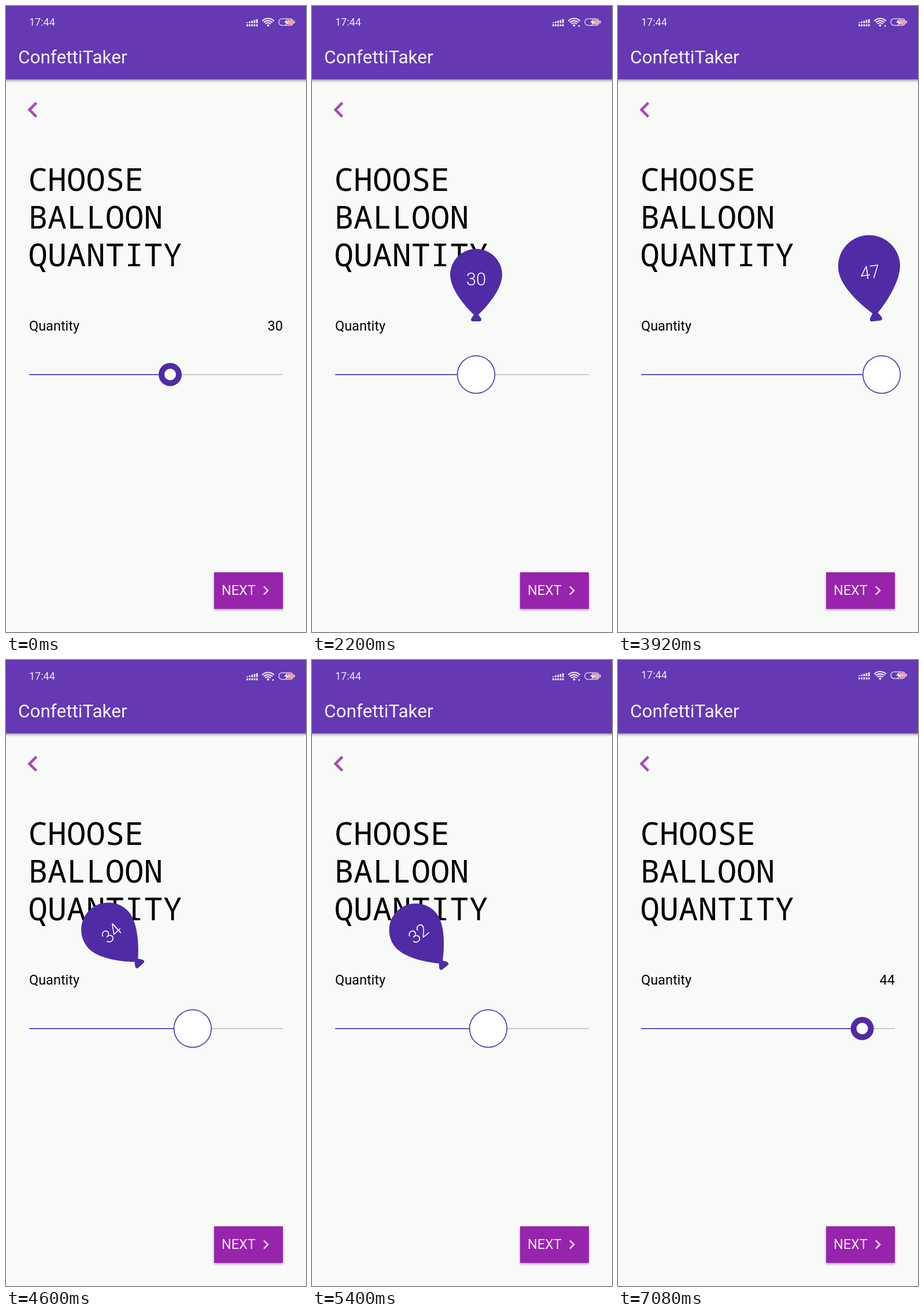
Write an HTML page with a canvas that moves like this. It is 519 px wide and 1080 px high and loops after 8.56 s.

```html
<!DOCTYPE html>
<html lang="en">
<head>
<meta charset="utf-8">
<style>
html, body { margin: 0; width: 100%; height: 100%; overflow: hidden; background: #f8faf8 }
canvas { display: block }
</style>
</head>
<body>
<canvas id="stage" width="519" height="1080"></canvas>
<script>
const c = document.getElementById('stage').getContext('2d');
const LOOP = 8560, LAG = 125;
const LEFT = 40, RIGHT = 479, TRACK_Y = 636, KNOT_Y = 544;
const INDIGO = '#4f2ca6', PURPLE = '#6439b3', PAPER = '#f8faf8';
const SANS = 'Roboto, "Open Sans", sans-serif';
const MONO = '"Noto Sans Mono", "DejaVu Sans Mono", monospace';

// Turning points of the drag: [time, x]
const drag = [[2200, 284], [3050, 73], [3110, 73], [3910, 456], [3985, 457], [4385, 152],
  [4780, 450], [5193, 164], [5622, 460], [5985, 82], [6360, 422.5]];

const balloon = new Path2D('M-45-17.5A45 45 0 0 1 45-17.5C45 4 24 32 4 51L8.5 57.5Q10 62.5 6 62.5' +
  'H-6Q-10 62.5-8.5 57.5L-4 51C-24 32-45 4-45-17.5Z');

const clamp = v => Math.min(1, Math.max(0, v));
const ramp = (t, a, b) => clamp((t - a) / (b - a));
const mix = (a, b, p) => a + (b - a) * p;
const easeOut = p => 1 - (1 - p) ** 3;
const backOut = p => 1 + 4 * (p - 1) ** 3 + 3 * (p - 1) ** 2;

function thumbX(t) {
  if (t <= drag[0][0]) return drag[0][1];
  for (let i = 1; i < drag.length; i++) {
    const [t0, x0] = drag[i - 1], [t1, x1] = drag[i];
    if (t < t1) return mix(x0, x1, (1 - Math.cos(Math.PI * ramp(t, t0, t1))) / 2);
  }
  return drag[drag.length - 1][1];
}

function text(s, x, y, size, color, { weight = 400, family = SANS, align = 'left' } = {}) {
  c.font = `${weight} ${size}px ${family}`;
  c.textAlign = align;
  c.fillStyle = color;
  c.fillText(s, x, y);
}

function box(x, y, w, h, color) {
  c.fillStyle = color;
  c.fillRect(x, y, w, h);
}

function raised(x, y, w, h, color) {
  c.save();
  c.shadowColor = 'rgba(0,0,0,.38)';
  c.shadowBlur = 4;
  c.shadowOffsetY = 2;
  box(x, y, w, h, color);
  c.restore();
}

function disc(x, y, r, color) {
  c.fillStyle = color;
  c.beginPath();
  c.arc(x, y, r, 0, 2 * Math.PI);
  c.fill();
}

function line(points, width, color) {
  c.strokeStyle = color;
  c.lineWidth = width;
  c.beginPath();
  points.forEach(([x, y]) => c.lineTo(x, y));
  c.stroke();
}

function statusBar(t) {
  const white = '#f1ebf8';
  c.save();
  c.translate(0, t < 6100 ? 0 : -1.5);
  text('17:44', 40, 33.5, 18, white);
  for (let i = 0; i < 5; i++) {
    const x = 416 + i * 4.2, h = 1.5 + i * 1.3;
    box(x, 29.5 - h, 2.8, h, white);
    box(x, 31.5, 2.8, 3.5, white);
  }
  c.strokeStyle = white;
  c.lineWidth = 2.2;
  for (const r of [6.5, 10.2, 14]) {
    c.beginPath();
    c.arc(453.5, 35.5, r, -Math.PI * .76, -Math.PI * .24);
    c.stroke();
  }
  disc(453.5, 33.5, 2, white);
  if (t > 1120 && t < 6300) box(461, 33, 2, 3, white);
  c.strokeStyle = '#d9cbea';
  c.lineWidth = 1.5;
  c.beginPath();
  c.roundRect(472, 22, 25, 11.5, 5.5);
  c.stroke();
  c.fillStyle = '#f3a49f';
  c.beginPath();
  c.roundRect(487, 23.5, 9, 8.5, [0, 4, 4, 0]);
  c.fill();
  box(498, 25.5, 1.8, 4.5, '#d9cbea');
  c.fillStyle = '#fff';
  c.fill(new Path2D('M487 22L481 28.5H485L483.5 34L489.5 27H485.5Z'));
  c.restore();
}

function page(t) {
  box(0, 0, 519, 1080, PAPER);
  raised(-10, -10, 539, 136.5, PURPLE);
  statusBar(t);
  text('ConfettiTaker', 21, 99, 31.5, '#f6f1fb');
  line([[52.5, 167], [40.5, 179], [52.5, 191]], 4.6, '#aa4abb');
  ['CHOOSE', 'BALLOON', 'QUANTITY'].forEach((word, i) =>
    text(word, 38.5, 319 + i * 65, 55.5, '#000', { family: MONO }));
  text('Quantity', 40, 560, 23.5, '#000');
  raised(360, 977, 119, 63, '#9824ad');
  text('NEXT', 373, 1016, 23.5, '#f6e6f8');
  line([[446, 1001.5], [453, 1008.5], [446, 1015.5]], 2.8, '#e6c6ea');
}

function drawBalloon(t, x, value, show) {
  if (show <= 0) return;
  const width = 65.5 + 44 * (x - LEFT) / (RIGHT - LEFT);
  const scale = width / 90 * show;
  const cx = thumbX(t - LAG);
  const restY = KNOT_Y - width * 125 / 180;
  c.save();
  c.translate(cx, mix(TRACK_Y, restY, show));
  c.rotate(Math.atan((cx - x) / 145));
  c.save();
  c.scale(scale, scale);
  c.fillStyle = INDIGO;
  c.fill(balloon);
  c.restore();
  c.scale(show, show);
  text(value, 0, .5, 31, '#fff', { weight: 300, align: 'center' });
  c.restore();
}

function slider(t) {
  const x = thumbX(t);
  const value = String(Math.floor(5 + (x - LEFT) / (RIGHT - LEFT) * 45 + .01));
  const release = easeOut(ramp(t, 6780, 7080));
  const press = ramp(t, 1100, 1520);
  const show = easeOut(press) * (1 - release);
  const grow = backOut(press) * (1 - release);

  line([[LEFT, TRACK_Y - .2], [RIGHT, TRACK_Y - .2]], 1.8, '#c3c5c5');
  line([[LEFT, TRACK_Y - .2], [x, TRACK_Y - .2]], 1.8, '#5b3dbd');
  c.globalAlpha = 1 - show;
  text(value, RIGHT, 560, 23.5, '#000', { align: 'right' });
  c.globalAlpha = 1;

  const outer = mix(20, 33.2, grow);
  const rim = mix(10, 1.6, clamp(grow));
  drawBalloon(t, x, value, show);
  disc(x, TRACK_Y - .2, outer, INDIGO);
  disc(x, TRACK_Y - .2, outer - rim, '#fff');
}

const start = performance.now();
function frame() {
  const t = (performance.now() - start) % LOOP;
  page(t);
  slider(t);
  requestAnimationFrame(frame);
}
frame();
</script>
</body>
</html>
```
